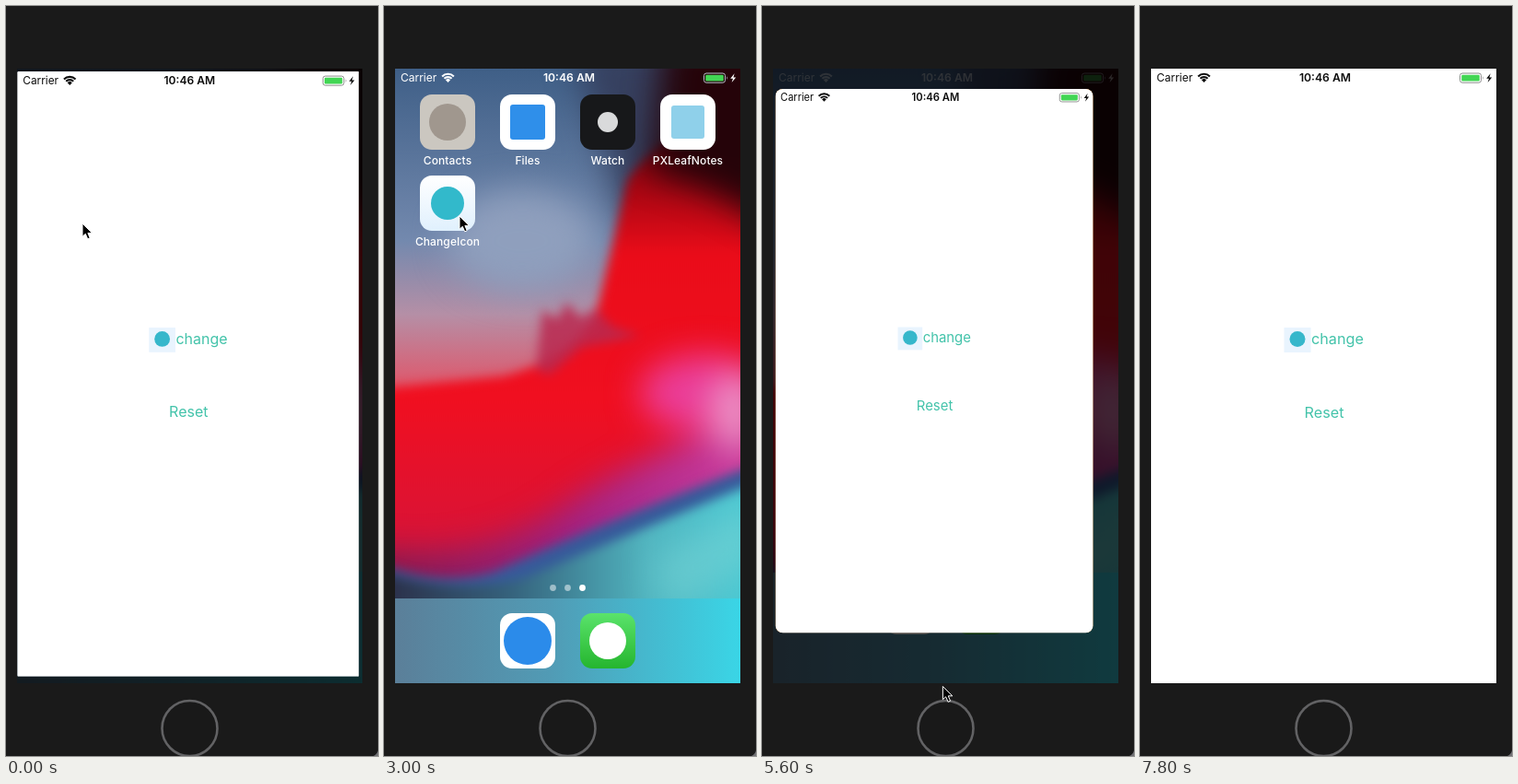
Animation, 404 px wide and 814 px high, one loop 7.9 s. Source, as an HTML page:

```html
<!DOCTYPE html>
<html lang="en">
<head>
<meta charset="utf-8">
<title>Icon switcher</title>
<style>
  html, body { margin: 0; width: 100%; height: 100%; overflow: hidden; background: #1a1a1a; }
  svg { display: block; width: 404px; height: 814px; }
  text { font-family: Inter, Roboto, "Open Sans", sans-serif; }
</style>
</head>
<body>
<svg viewBox="0 0 404 814" xmlns="http://www.w3.org/2000/svg">
  <defs>
    <clipPath id="display"><rect x="12" y="68" width="375" height="667"/></clipPath>
    <clipPath id="windowClip"><rect id="windowShape"/></clipPath>
    <filter id="soft" x="-30%" y="-30%" width="160%" height="160%" color-interpolation-filters="sRGB"><feGaussianBlur stdDeviation="6"/></filter>
    <filter id="haze" x="-60%" y="-60%" width="220%" height="220%" color-interpolation-filters="sRGB"><feGaussianBlur stdDeviation="18"/></filter>
    <linearGradient id="sky" x1="0" y1="0" x2="0" y2="1">
      <stop offset="0" stop-color="#3f5f87"/>
      <stop offset=".28" stop-color="#7389ae"/>
      <stop offset=".4" stop-color="#b58fa6"/>
      <stop offset=".52" stop-color="#e0566a"/>
    </linearGradient>
    <linearGradient id="ember" x1="0" y1="0" x2="0" y2="1">
      <stop offset="0" stop-color="#3a0209"/>
      <stop offset=".15" stop-color="#a00612"/>
      <stop offset=".3" stop-color="#ea0c19"/>
      <stop offset=".6" stop-color="#f00f20"/>
      <stop offset="1" stop-color="#d01540"/>
    </linearGradient>
    <linearGradient id="plum" x1="0" y1="0" x2="1" y2="0">
      <stop offset="0" stop-color="#7a1a4c"/>
      <stop offset=".5" stop-color="#9c2284"/>
      <stop offset="1" stop-color="#d23fa0"/>
    </linearGradient>
    <linearGradient id="sea" x1="0" y1="0" x2="1" y2="0">
      <stop offset="0" stop-color="#2a2a44"/>
      <stop offset=".35" stop-color="#35627c"/>
      <stop offset=".7" stop-color="#50b3be"/>
      <stop offset="1" stop-color="#4accd6"/>
    </linearGradient>
    <linearGradient id="dockFill" x1="0" y1="0" x2="1" y2="0">
      <stop offset="0" stop-color="#5b7f99"/>
      <stop offset=".45" stop-color="#519bb5"/>
      <stop offset="1" stop-color="#3ad5e6"/>
    </linearGradient>
    <linearGradient id="leaf" x1="0" y1="0" x2="0" y2="1">
      <stop offset="0" stop-color="#5ae36b"/><stop offset="1" stop-color="#25b52e"/>
    </linearGradient>
    <linearGradient id="frost" x1="0" y1="0" x2="0" y2="1">
      <stop offset="0" stop-color="#fff"/><stop offset="1" stop-color="#e0f0fd"/>
    </linearGradient>
  </defs>

  <rect width="404" height="814" fill="#1a1a1a"/>
  <path d="M404 808Q403 812 399 814H404Z" fill="#707074"/>
  <circle cx="199.5" cy="784" r="30" fill="#191919" stroke="#626264" stroke-width="2.6"/>

  <g clip-path="url(#display)">
    <g id="wallpaper">
      <rect x="12" y="68" width="375" height="667" fill="url(#sky)"/>
      <g filter="url(#haze)">
        <ellipse cx="150" cy="255" rx="80" ry="55" fill="#8f9fbd"/>
        <path d="M205 40H420V260L262 235Z" fill="#36405f"/>
      </g>
      <g filter="url(#soft)">
        <path d="M264 190Q300 130 420 110V640H-10V416L130 402Q195 385 229 340Z" fill="url(#ember)"/>
        <path d="M165 395L172 330L188 340L198 322L214 338L230 328L248 348L280 358L215 370L180 400Z" fill="#b92a50" opacity=".85"/>
      </g>
      <g filter="url(#haze)">
        <path d="M305 30H440V250Q350 190 290 180Z" fill="#250309"/>
        <path d="M-20 590Q100 610 190 550Q270 490 420 440V570L190 650H-20Z" fill="url(#plum)"/>
        <ellipse cx="350" cy="420" rx="72" ry="42" fill="#ea3d98"/>
        <ellipse cx="382" cy="440" rx="30" ry="42" fill="#eb8cc2"/>
      </g>
      <g filter="url(#soft)">
        <path d="M-10 604Q60 632 120 614Q240 560 410 495V760H-10Z" fill="#365a9a"/>
        <path d="M-10 612Q70 640 150 622Q250 580 410 515V760H-10Z" fill="url(#sea)"/>
      </g>
      <path d="M290 600L410 535V600L310 660Z" fill="#74d2d4" opacity=".6" filter="url(#haze)"/>
    </g>
    <rect id="dock" x="12" y="643" width="375" height="140" fill="url(#dockFill)"/>
    <g id="home"></g>
    <g id="homeStatus"></g>
    <rect id="dim" x="12" y="68" width="375" height="667"/>
    <g clip-path="url(#windowClip)">
      <rect id="tile"/>
      <circle id="tileMark" fill="#32b9cb"/>
      <g id="screen"></g>
    </g>
  </g>
  <path id="cursor" d="M0 0V14.3L3.3 11.3L5.7 16.8L8.2 15.8L5.9 10.4H10.4Z" stroke="#fff"/>
</svg>

<script>
const LOOP = 7900, STEP = 100;
const $ = id => document.getElementById(id);
const set = (el, attrs) => { for (const k in attrs) el.setAttribute(k, attrs[k]); };
const clamp = v => Math.max(0, Math.min(1, v));
const mix = (a, b, p) => a + (b - a) * p;
const easeOut = u => 1 - (1 - clamp(u)) ** 3;
const easeInOut = u => { u = clamp(u); return u * u * (3 - 2 * u); };

const label = (text, x, y, size, fill, extra = '') =>
  `<text x="${x}" y="${y}" font-size="${size}" fill="${fill}" ${extra}>${text}</text>`;
const caption = (name, x, y) =>
  label(name, x, y, 12, '#fff', 'text-anchor="middle" font-weight="500" letter-spacing=".1"');

function statusBar(ink, rim) {
  const arc = r => {
    const d = r * Math.SQRT1_2;
    return `<path d="M${69.5 - d} ${82.8 - d}A${r} ${r} 0 0 1 ${69.5 + d} ${82.8 - d}" fill="none" stroke="${ink}" stroke-width="2.1"/>`;
  };
  return label('Carrier', 18, 82.4, 12, ink) +
    arc(9) + arc(5.7) + `<path d="M69.5 83L66.9 80.3A3.7 3.7 0 0 1 72.1 80.3Z" fill="${ink}"/>` +
    label('10:46 AM', 201, 82.4, 12.2, ink, 'text-anchor="middle" font-weight="600"') +
    `<rect x="347.5" y="73" width="23" height="10.2" rx="2.6" fill="none" stroke="${rim}"/>
     <rect x="349.2" y="74.7" width="19.6" height="6.8" rx="1.2" fill="#42d654"/>
     <path d="M372.3 76.2Q374 78 372.3 80Z" fill="${rim}"/>
     <path d="M380.6 73.3L376.2 78.8H379L377.6 83L382.2 77.4H379.4Z" fill="${ink}"/>`;
}

// Rounded tile in a grid column, with one plain mark; r is the mark's corner radius.
function appIcon(name, column, y, fill, color, size, r = size / 2) {
  const x = 69 + 87 * column;
  const square = (side, rx, paint) =>
    `<rect x="${x - side / 2}" y="${y - side / 2}" width="${side}" height="${side}" rx="${rx}" fill="${paint}"/>`;
  return square(60, 13, fill) + square(size, r, color) + caption(name, x, y + 46);
}

const dots = [-1, 0, 1].map(i =>
  `<circle cx="${199.5 + 16 * i}" cy="631.5" r="3.4" fill="#fff" opacity="${i < 1 ? .5 : 1}"/>`);

$('home').innerHTML =
  appIcon('Contacts', 0, 126, '#cbc7c0', '#a0978e', 40) +
  appIcon('Files', 1, 126, '#fff', '#2f8fea', 38, 3) +
  appIcon('Watch', 2, 126, '#17181a', '#d9dadb', 22) +
  appIcon('PXLeafNotes', 3, 126, '#fff', '#8fd0ea', 36, 3) +
  appIcon('', 1, 689, '#fff', '#2b8bea', 52) +
  appIcon('', 2, 689, 'url(#leaf)', '#fff', 40) +
  caption('ChangeIcon', 69, 260) + dots.join('');

$('homeStatus').innerHTML = statusBar('#fff', '#b9c0cb');

const mint = '#43c3aa';
$('screen').innerHTML = '<rect x="12" y="68" width="375" height="667" fill="#fff"/>' +
  statusBar('#0c0c0c', '#8d8d8d') +
  '<rect x="156.5" y="349" width="29" height="27" fill="#e9f4fe"/>' +
  '<circle cx="171" cy="361.5" r="8.5" fill="#36b7cb"/>' +
  label('change', 186, 367.4, 16.2, mint) +
  label('Reset', 200, 447.4, 16.2, mint, 'text-anchor="middle"');

// Each maps elapsed ms to the window's growth and the home screen's recession.
const opening = ms => {
  const grow = easeOut(ms / 405);
  return { grow, recede: grow ** 3 };
};
const closing = ms => ({ grow: 1 - easeInOut(ms / 320), recede: 1 - easeInOut(ms / 385) });

const transitions = [
  { start: -310, run: opening }, { start: 2215, run: closing },
  { start: 3390, run: opening }, { start: 5539, run: closing },
  { start: 6900, run: opening }
];
const SWITCH = 5539, EXIT = 7700;

const rest = { x: 83, y: 236 };
const moves = [
  { at: 0, ms: 800, x: 197, y: 360 },
  { at: 900, ms: 800, x: 205, y: 762 },
  { at: 2200, ms: 600, x: 82, y: 228 },
  { at: 3900, ms: 500, x: 199, y: 438 },
  { at: 4700, ms: 700, x: 202, y: 764 },
  { at: 5500, ms: 750, x: 86, y: 238 },
  { at: 7100, ms: 600, x: 110, y: 35 }
];

const pointerAt = t => moves.reduce((pos, m) => {
  const u = easeInOut((t - m.at) / m.ms);
  return { x: mix(pos.x, m.x, u), y: mix(pos.y, m.y, u) };
}, rest);

function drawWindow(p, switched) {
  const x = mix(39, 12, p), y = mix(184, 68, p ** 2.1), width = mix(60, 375, p);
  const height = Math.max(width, mix(60, 667, p ** 1.35));
  const box = { x, y, width, height };
  set($('windowShape'), { ...box, rx: (1 - p) * (13 + 80 * p) });
  set($('tile'), { ...box, fill: switched ? '#ed9430' : 'url(#frost)' });
  set($('tileMark'), { cx: x + width / 2, cy: y + height / 2, r: width * .3, opacity: switched ? 0 : 1 });
  set($('screen'), {
    transform: `translate(${x} ${y}) scale(${width / 375}) translate(-12 -68)`,
    opacity: clamp((p - .1) / .3)
  });
}

function draw(t) {
  const { start, run } = transitions.filter(tr => tr.start <= t).pop();
  const { grow, recede } = run(t - start);
  const zoom = 1 - .125 * recede, dim = .8 * grow;

  drawWindow(grow, t >= SWITCH);
  set($('home'), { transform: `translate(199.5 401.5) scale(${zoom}) translate(-199.5 -401.5)` });
  set($('dock'), { y: mix(401.5, 643, zoom) });
  set($('homeStatus'), { opacity: clamp((1 - dim) * 2) });
  set($('dim'), { opacity: dim });

  const { x, y } = pointerAt(t);
  set($('cursor'), { transform: `translate(${x} ${y})`, visibility: t < EXIT ? 'visible' : 'hidden' });
}

const begin = performance.now();
function tick() {
  const t = (performance.now() - begin) % LOOP;
  draw(Math.floor(t / STEP) * STEP);
  requestAnimationFrame(tick);
}
tick();
</script>
</body>
</html>
```
